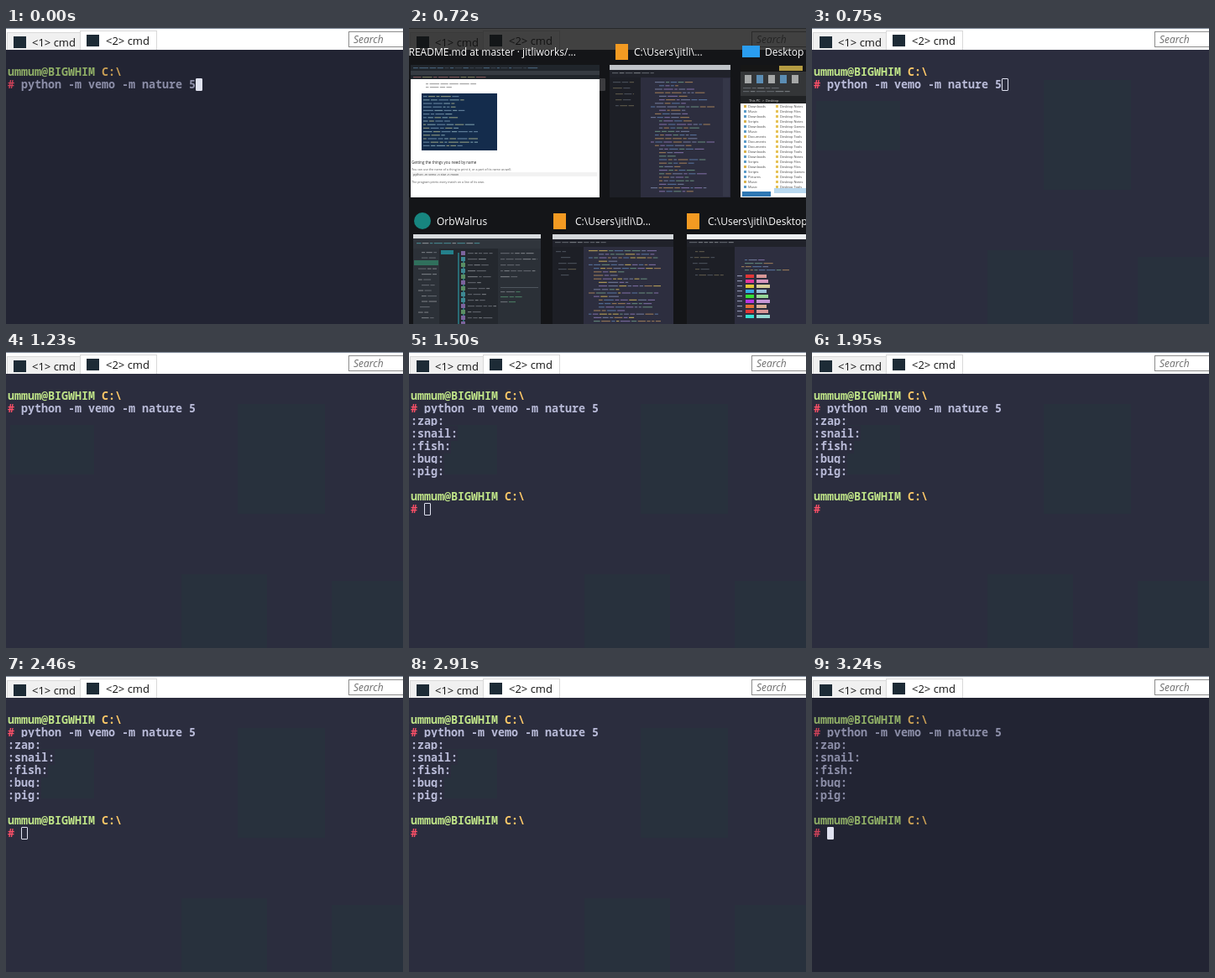
An HTML page for the animation above (3.33 s loop, 473 by 353 pixels).

```html
<!DOCTYPE html>
<html lang="en">
<head>
<meta charset="utf-8">
<title>Terminal</title>
<style>
  html, body { margin: 0; width: 100%; height: 100%; overflow: hidden; }
  #stage {
    position: relative; width: 473px; height: 353px; overflow: hidden;
    background: var(--bg);
    --bg: #222433; --green: #8fae66; --gold: #cba055; --red: #cf4259; --text: #8c8ea8;
  }
  #stage, #stage .timed { animation: 3330ms step-end infinite; }
  #stage { animation-name: focus; }
  .timed, .abs, .tab, .ghost { position: absolute; }

  /* window bar */
  #bar { left: 0; top: 0; width: 473px; height: 26px; background: #fff; box-shadow: inset 0 1px #7c8796; }
  .tab, #search { font: 13px/18px "Open Sans", "Noto Sans", sans-serif; color: #111; white-space: pre; box-sizing: border-box; }
  .tab { border: 1px solid #d9d9d9; border-bottom: 0; }
  .tab i { position: absolute; left: 7px; width: 15px; height: 14px; background: #1d2b36; }
  .tab span { position: absolute; left: 30px; }
  #tab1 { left: 1px; top: 5px; width: 88px; height: 21px; background: #f0f0f0; }
  #tab1 i { top: 4px; } #tab1 span { top: 2px; left: 29px; }
  .active { left: 88px; top: 3px; width: 92px; height: 23px; background: #fff; }
  .active i { top: 4px; } .active span { top: 2px; }
  #stage .long { width: 167px; animation-name: running; }
  #search { left: 408px; top: 4px; width: 70px; height: 19px; border: 1px solid #8b8b8b; padding-left: 5px;
    font-size: 12px; line-height: 17px; font-style: italic; color: #6d6d6d; }

  /* console */
  .lines { left: 2px; margin: 0; font: 600 13.333px/15px "Noto Sans Mono", "DejaVu Sans Mono", monospace; color: var(--text); }
  .lines .fill { background: var(--bg); }
  .lines b { font-weight: 600; color: var(--green); }
  .lines u { text-decoration: none; color: var(--gold); }
  .lines em { font-style: normal; color: var(--red); }
  #stage .output { top: 75px; animation-name: output; }
  #stage .prompt { top: 165px; animation-name: prompt; }
  #stage #cursor { left: 0; top: 0; width: 8px; height: 15px; box-sizing: border-box;
    border: 1px solid #e0e2f0; border-radius: 1px; animation-name: cursor; }
  #stage #ghosts { animation-name: ghosts; }
  .ghost { background: rgba(32, 64, 62, .2); }

  #stage #switcher { left: 0; top: 0; animation-name: switcher; }
  #switcher text { font-family: "Open Sans", "Noto Sans", sans-serif; white-space: pre; }

  @keyframes focus {
    0%, 97.2972% { --bg: #222433; --green: #8fae66; --gold: #cba055; --red: #cf4259; --text: #8c8ea8; }
    22.5225% { --bg: #2b2d3e; --green: #bfe488; --gold: #ffc968; --red: #ff5068; --text: #b9bbd8; }
  }
  @keyframes switcher { 0%, 22.5225% { opacity: 0; } 21.6216% { opacity: 1; } }
  @keyframes ghosts { 0%, 97.2972% { opacity: 0; } 22.5225% { opacity: 1; } }
  @keyframes running { 0%, 44.1441% { opacity: 0; } 41.4414% { opacity: 1; } }
  @keyframes output { 0% { opacity: 0; } 43.2432%, 100% { opacity: 1; } }
  @keyframes prompt { 0% { opacity: 0; } 44.1441%, 100% { opacity: 1; } }
  @keyframes cursor {
    0% { transform: translate(226px, 60px); opacity: 1; background: #e0e2f0; }
    22.5225% { background: transparent; }
    36.9369%, 58.5585%, 87.3873% { opacity: 0; }
    45.045% { transform: translate(18px, 180px); opacity: 1; }
    73.8738% { opacity: 1; }
    97.2972%, 100% { transform: translate(18px, 180px); opacity: 1; background: #e0e2f0; }
  }
</style>
</head>
<body>
<div id="stage">
  <div id="ghosts" class="timed">
    <div class="ghost" style="left:5px;top:87px;width:100px;height:59px"></div>
    <div class="ghost" style="left:276px;top:62px;width:104px;height:131px"></div>
    <div class="ghost" style="left:209px;top:265px;width:102px;height:88px"></div>
    <div class="ghost" style="left:388px;top:273px;width:85px;height:80px"></div>
  </div>

  <div id="bar" class="abs"></div>
  <div id="tab1" class="tab"><i></i><span>&lt;1&gt; cmd</span></div>
  <div class="tab active"><i></i><span>&lt;2&gt; cmd</span></div>
  <div class="tab active long timed"><i></i><span>&lt;2&gt; cmd - python -m…</span></div>
  <div id="search" class="abs">Search</div>

  <pre class="lines abs" style="top:45px"><b>ummum@BIGWHIM</b> <u>C:\</u>
<em>#</em> python -m vemo -m nature 5</pre>
  <pre class="lines output timed"><span class="fill">:zap:
:snail:
:fish:
:bug:
:pig:</span></pre>
  <pre class="lines prompt timed"><b>ummum@BIGWHIM</b> <u>C:\</u>
<em>#</em></pre>
  <div id="cursor" class="timed"></div>

  <svg id="switcher" class="timed" width="473" height="353" viewBox="0 0 473 353"></svg>
</div>

<script>
  const svg = document.getElementById('switcher');
  let seed = 11;
  const rnd = () => (seed = seed * 16807 % 2147483647) / 2147483647;
  const pick = list => list[Math.floor(rnd() * list.length)];

  function add(tag, attrs, text = '') {
    const el = document.createElementNS('http://www.w3.org/2000/svg', tag);
    for (const key in attrs) el.setAttribute(key, attrs[key]);
    el.textContent = text;
    svg.append(el);
  }
  const box = (x, y, width, height, fill) => add('rect', { x, y, width, height, fill });
  const label = (x, y, text, size = 12, fill = '#fff', anchor = 'start') =>
    add('text', { x, y, 'font-size': size, fill, 'text-anchor': anchor }, text);

  // rows of small dashes standing for tiny text
  function rows(x, y, w, count, step, colors, indent = 0) {
    for (let i = 0; i < count; i++) {
      let at = x + Math.floor(rnd() * 3) * indent;
      const end = x + w * (.35 + .65 * rnd());
      while (at < end) {
        const len = Math.min(3 + rnd() * 9, x + w - at);
        add('rect', { x: at, y: y + i * step, width: len, height: 1.2, fill: pick(colors), opacity: .75 });
        at += len + 1.5;
      }
    }
  }

  const code = ['#7d86a8', '#8d78b5', '#6f9a86', '#b08a5c', '#5f7fae'];
  const grey = ['#6c7078', '#888c92'];

  function browser() {
    box(2, 44, 225, 158, '#fff');
    box(2, 44, 225, 17, '#20252b');
    rows(5, 47, 215, 1, 4, ['#50718c', '#3d4650']);
    box(2, 51, 225, 5, '#363b42');
    rows(5, 58, 215, 1, 4, ['#8f8a63', '#587d98', '#966060']);
    rows(20, 66, 65, 2, 4, ['#888']);
    box(15, 78, 90, 68, '#142c4c');
    rows(17, 81, 65, 15, 4.2, ['#8db1bd', '#7697b0', '#a9b08b']);
    label(3, 162, 'Getting the things you need by name', 4.5, '#222');
    label(3, 170, 'You can use the name of a thing to print it, or a part of its name as well.', 3.6, '#555');
    box(3, 172, 221, 5, '#f2f2f2');
    label(5, 176, 'python -m vemo -n star -n moon', 3.6, '#444');
    label(3, 185, 'The program prints every match on a line of its own.', 3.6, '#555');
  }

  function editor(x, y, w, h, side, bar) {
    box(x, y, w, h, '#2d2e3f');
    box(x, y, w, 6, bar);
    box(x, y + 6, w, 9, '#20222a');
    rows(x + 3, y + 9, w * .6, 1, 4, grey);
    box(x, y + 15, side, h - 15, '#1d1f26');
    rows(x + 4, y + 20, side - 12, 5, 7, ['#555b66', '#6b6550'], 3);
  }

  function explorer() {
    box(395, 44, 78, 158, '#fff');
    box(395, 44, 78, 8, '#161616');
    box(441, 45, 28, 6, '#b49b42');
    box(395, 52, 78, 29, '#343638');
    for (let i = 0; i < 5; i++) box(400 + i * 14, 56, 8, 10, i % 2 ? '#5b8db4' : '#a6a8a8');
    rows(398, 71, 72, 2, 4, grey);
    box(395, 81, 78, 9, '#202224');
    label(405, 88, 'This PC  >  Desktop', 4, '#ddd');
    for (let i = 0; i < 17; i++) {
      const y = 95 + i * 6;
      box(399, y - 3, 3, 3, i % 3 ? '#5b9bc8' : '#d8b24d');
      label(404, y, pick(['Documents', 'Pictures', 'Downloads', 'Music', 'Scripts']), 4, '#444');
      box(437, y - 3, 3, 3, '#e6c255');
      label(442, y, 'Desktop ' + pick(['Files', 'Tools', 'Notes', 'Games']), 4, '#444');
    }
    box(435, 191, 38, 6, '#b9d9f0');
    box(397, 195, 34, 6, '#2f78b4');
  }

  function graph() {
    box(5, 246, 152, 107, '#24282e');
    box(5, 246, 152, 5, '#d9dcdf');
    box(5, 251, 152, 12, '#30353c');
    rows(9, 256, 142, 1, 5, ['#9da3a9', '#4b98a0']);
    box(5, 263, 31, 90, '#2c3138');
    rows(11, 267, 22, 13, 6.5, grey, 2);
    box(6, 277, 29, 6, '#30705c');
    box(38, 265, 15, 5, '#24808b');
    add('path', { d: 'M59 268V353M65 278V353', stroke: '#2eaebb', fill: 'none' });
    for (let y = 268; y < 353; y += 7) box(62, y - 2, 5, 5, pick(['#3e8792', '#7c639c', '#5a8d63']));
    rows(70, 268, 34, 12, 7, grey);
    box(106, 263, 51, 90, '#2b3037');
    rows(109, 268, 44, 5, 7, grey);
    box(109, 309, 45, 1, '#4f565e');
    rows(109, 314, 40, 3, 6, ['#518b6b', '#777d83']);
  }

  box(0, 0, 473, 353, 'rgba(18,18,18,.8)');

  label(199, 33, '/README.md at master · jitliworks/...', 12, '#fff', 'end');
  browser();

  box(246, 19, 15, 19, '#f39a22');
  label(268, 33, 'C:\\Users\\jitli\\...');
  editor(239, 44, 144, 158, 37, '#bfc3c8');
  rows(288, 64, 76, 32, 4.2, code, 5);
  box(374, 60, 8, 141, '#353748');

  box(397, 21, 21, 14, '#2a9df0');
  label(424, 33, 'Desktop');
  explorer();

  add('circle', { cx: 16, cy: 230, r: 10, fill: '#17857f' });
  label(33, 235, 'OrbWalrus');
  graph();

  box(172, 221, 15, 19, '#f39a22');
  label(198, 235, 'C:\\Users\\jitli\\D...');
  editor(171, 246, 144, 107, 37, '#d4d7da');
  rows(214, 265, 86, 21, 4.2, [...code, '#d3b75d'], 6);

  box(331, 221, 15, 19, '#f39a22');
  label(356, 235, 'C:\\Users\\jitli\\Desktop\\vemo');
  editor(331, 246, 144, 107, 57, '#eceef0');
  rows(392, 276, 70, 4, 4, code, 4);
  const hues = [0, 325, 50, 200, 120, 285, 20, 0, 175];
  hues.forEach((h, i) => {
    const y = 294 + i * 6;
    box(401, y, 10, 4, `hsl(${h} 75% 55%)`);
    box(414, y, 12 + i % 3 * 2, 4, `hsl(${h} 45% 72%)`);
    box(391, y + 1, 6, 1.2, '#8c91ab');
  });
</script>
</body>
</html>
```
